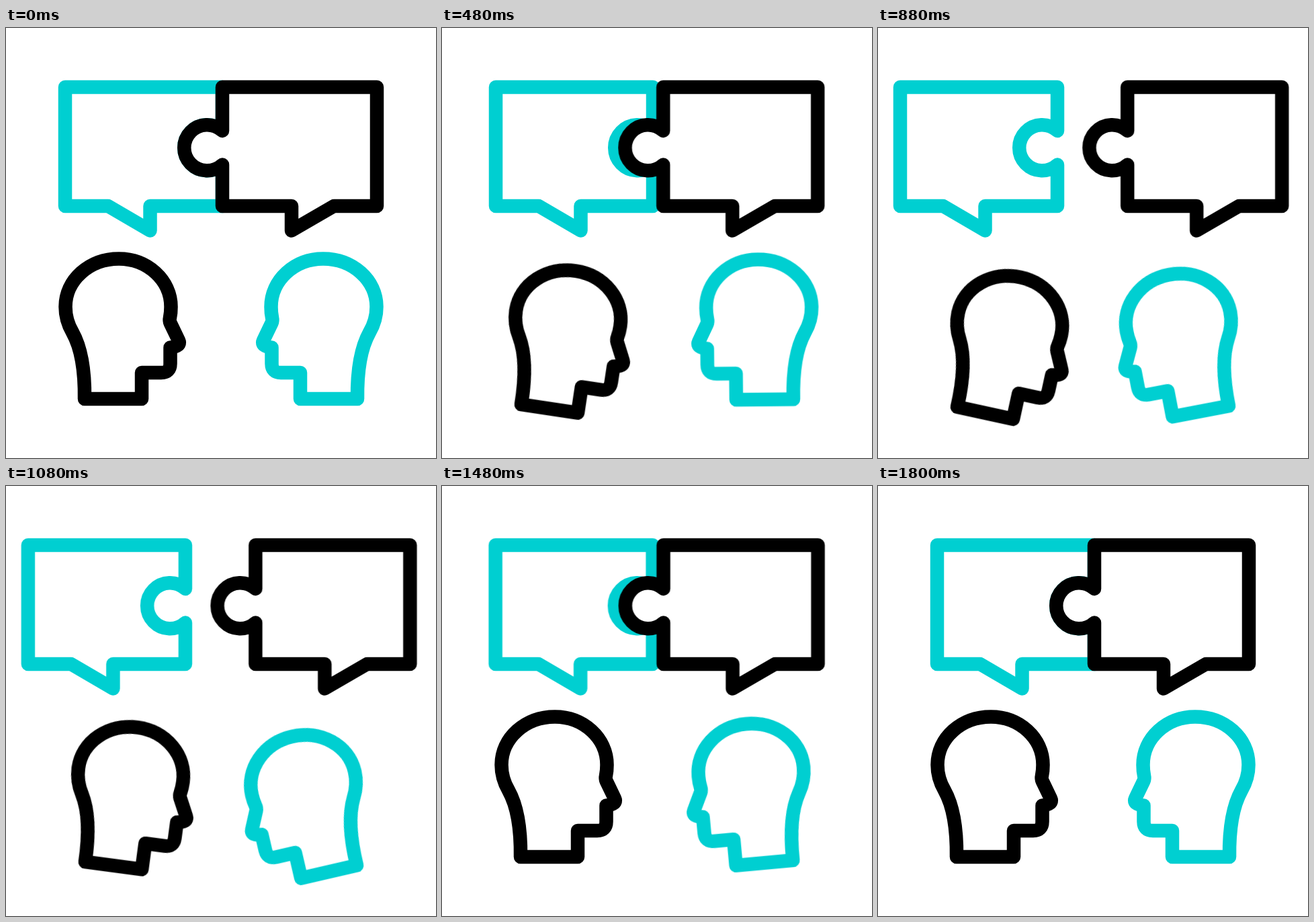
Recreate the animation shown at these times as an HTML page without scripts. Size 640 px wide and 640 px high, loop 2000 ms.

```html
<!DOCTYPE html>
<html lang="en">
<head>
<meta charset="utf-8">
<title>Conversation</title>
<style>
  html, body { margin: 0; width: 100%; height: 100%; overflow: hidden; background: #fff; }
  svg { display: block; width: 100%; height: 100%; }

  .line {
    fill: none;
    stroke-width: 20.5;
    stroke-linejoin: round;
    stroke-linecap: round;
  }
  .dark { stroke: #000; }
  .teal { stroke: #00cfd1; }

  .bubble { animation: part 2s infinite; }
  .left { --shift: -57px; }
  .right { --shift: 51px; fill: #fff; }

  .head {
    transform-origin: 62px 562.5px;
    animation: nod 2s infinite;
  }
  .reply { animation-delay: .32s; }

  @keyframes part {
    0%, 16.8% { transform: none; animation-timing-function: cubic-bezier(.333, 0, .667, 1); }
    47.5% { transform: translateX(var(--shift)); }
    50.75% { transform: translateX(var(--shift)); animation-timing-function: cubic-bezier(.333, 0, .667, 1); }
    81.5%, 100% { transform: none; }
  }
  @keyframes nod {
    0%, 2.5% { transform: rotate(0deg); animation-timing-function: cubic-bezier(.478, 0, .617, 1); }
    37% { transform: rotate(13deg); }
    39.4% { transform: rotate(13deg); animation-timing-function: cubic-bezier(.333, 0, .667, 1); }
    72.4%, 100% { transform: rotate(0deg); }
  }
</style>
</head>
<body>
<svg viewBox="0 0 640 640">
  <defs>
    <path id="head" d="M117 552H202V513H231Q244.5 513 244.5 499.5V475.5
      Q248 475.5 252 474Q260 471.5 257 465L244.5 439Q243 435.5 244 431
      Q245.5 424 245.5 415C245.5 375 210.5 343.5 168 343.5
      C124 343.5 88.5 375 88.5 415C88.5 429 92 441 99 453
      C113 478 117.5 511 117 552Z"/>
  </defs>

  <path class="line teal bubble left" d="M88 88H322V153A34 34 0 1 0 322 203.5V265H214.5V301.5L152 265H88Z"/>
  <path class="line dark bubble right" d="M322 88H552V265H488L425 301.5V265H322V203.5A34 34 0 1 1 322 153Z"/>

  <use class="line dark head" href="#head"/>
  <g transform="matrix(-1 0 0 1 640 0)">
    <use class="line teal head reply" href="#head"/>
  </g>
</svg>
</body>
</html>
```
